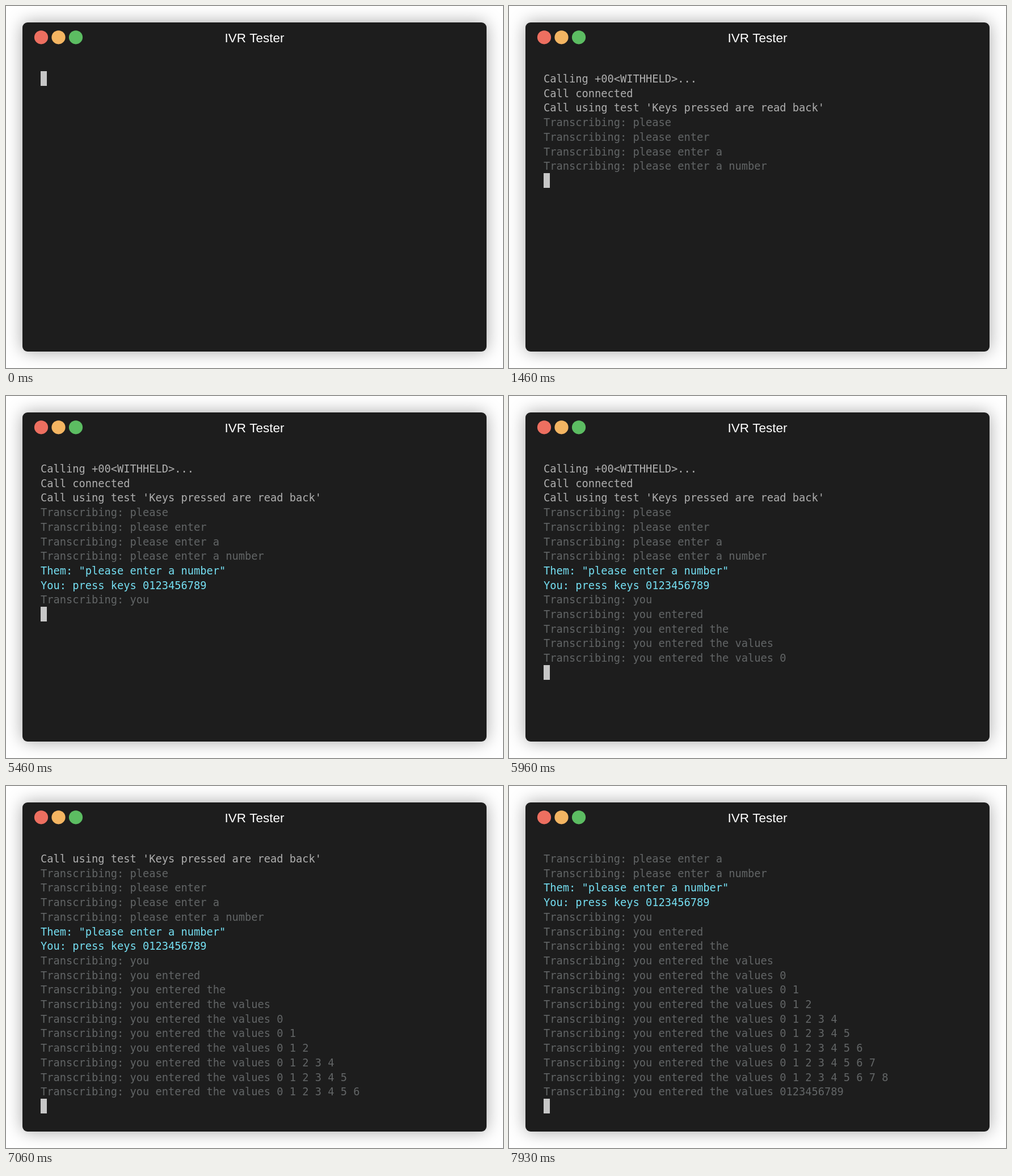
These frames come from a looping animation (876 by 639 pixels, 8000 ms). An HTML page with a canvas:

```html
<!DOCTYPE html>
<html lang="en">
<head>
<meta charset="utf-8">
<title>IVR Tester</title>
<style>
  html, body { margin: 0; width: 100%; height: 100%; overflow: hidden; background: #fff; }
  canvas { display: block; }
</style>
</head>
<body>
<canvas id="stage" width="876" height="639"></canvas>
<script>
const ctx = document.getElementById('stage').getContext('2d');

const LOOP = 8000;
const ROWS = 18;
const LEFT = 61, TOP = 115.5, ROW_HEIGHT = 25.7, CURSOR_WIDTH = 11;
const PLAIN = '#afafaf', DIM = '#626566', BLUE = '#75dff2';

const lines = [];
const print = (time, color, text) => lines.push({ time, color, text });
const transcribe = (time, text) => print(time, DIM, 'Transcribing: ' + text);

print(500, PLAIN, 'Calling +00<WITHHELD>...');
print(500, PLAIN, 'Call connected');
print(500, PLAIN, "Call using test 'Keys pressed are read back'");
transcribe(610, 'please');
transcribe(720, 'please enter');
transcribe(830, 'please enter a');
transcribe(1460, 'please enter a number');
print(3460, BLUE, 'Them: "please enter a number"');
print(3460, BLUE, 'You: press keys 0123456789');
transcribe(5460, 'you');
transcribe(5610, 'you entered');
transcribe(5750, 'you entered the');
transcribe(5850, 'you entered the values');

// Highest digit heard so far, with the time it was heard.
const heard = [[5960, 0], [6220, 1], [6460, 2], [6700, 4], [6940, 5], [7060, 6], [7180, 7], [7300, 8]];
for (const [time, last] of heard) {
  transcribe(time, 'you entered the values ' + [...'0123456789'].slice(0, last + 1).join(' '));
}
transcribe(7930, 'you entered the values 0123456789');

function drawWindow() {
  ctx.fillStyle = '#fff';
  ctx.fillRect(0, 0, 876, 639);

  ctx.save();
  ctx.shadowColor = 'rgba(0, 0, 0, 0.35)';
  ctx.shadowBlur = 30;
  ctx.fillStyle = '#1d1d1d';
  ctx.beginPath();
  ctx.roundRect(29, 29, 818, 581, 9);
  ctx.fill();
  ctx.restore();

  ['#ed6f60', '#f4b562', '#5cbd62'].forEach((color, i) => {
    ctx.fillStyle = color;
    ctx.beginPath();
    ctx.arc(62 + i * 30.5, 55.3, 12.1, 0, Math.PI * 2);
    ctx.fill();
  });

  ctx.font = '22.5px "Liberation Sans", Arial, sans-serif';
  ctx.textAlign = 'center';
  ctx.fillStyle = '#fff';
  ctx.fillText('IVR Tester', 438, 64);
}

function drawTerminal(time) {
  const visible = lines.filter(line => line.time <= time).slice(1 - ROWS);
  ctx.font = '18.7px "DejaVu Sans Mono", monospace';
  ctx.textAlign = 'left';
  visible.forEach(({ color, text }, row) => {
    ctx.fillStyle = color;
    ctx.fillText(text, LEFT, Math.round(135 + row * ROW_HEIGHT));
  });
  ctx.fillStyle = '#c7c7c7';
  ctx.fillRect(LEFT, Math.round(TOP + visible.length * ROW_HEIGHT - 0.4), CURSOR_WIDTH, 26);
}

const start = performance.now();
function frame() {
  drawWindow();
  drawTerminal((performance.now() - start) % LOOP);
  requestAnimationFrame(frame);
}
frame();
</script>
</body>
</html>
```
